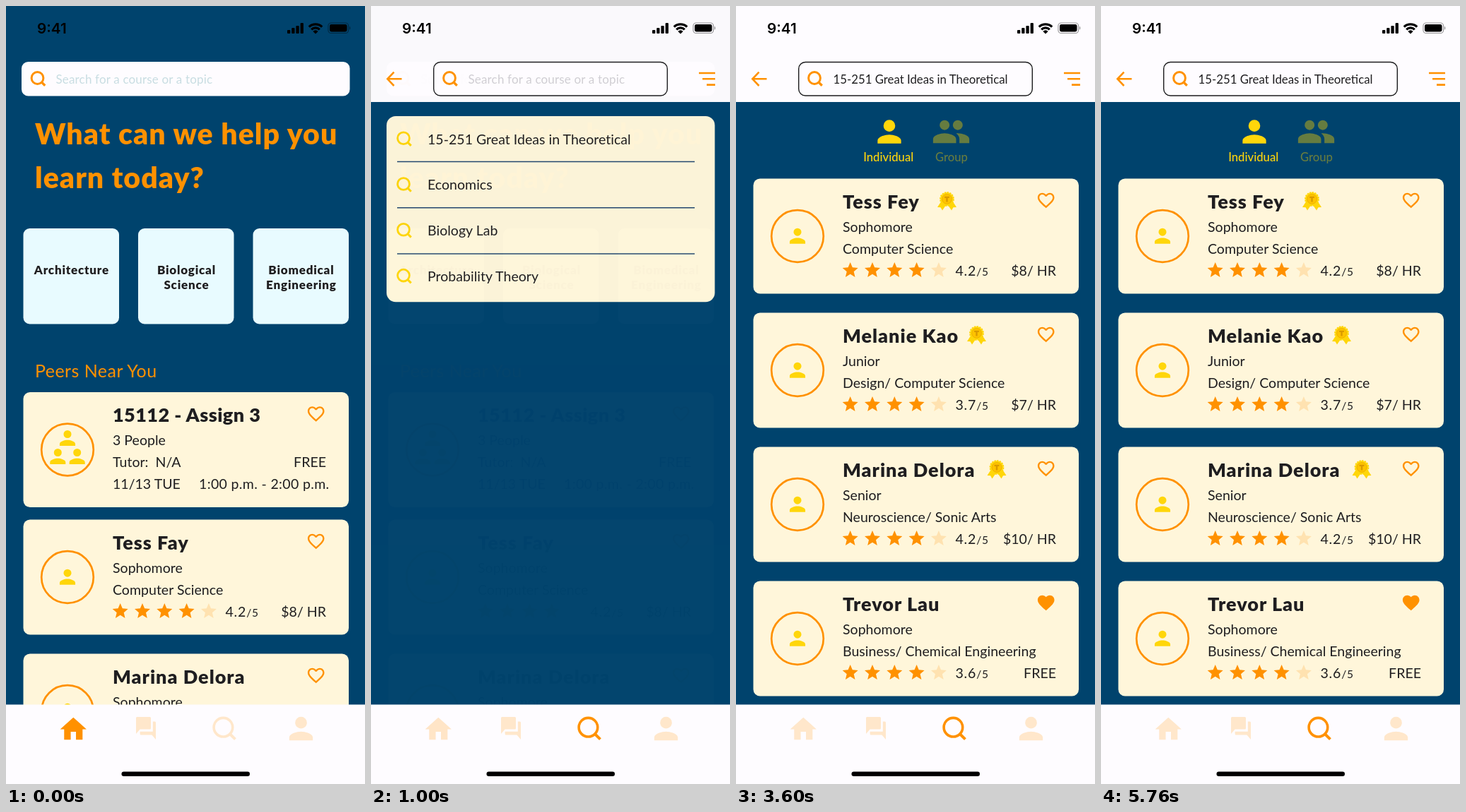
Animation of 508x1102 px, one loop 5800 ms. Source, as an HTML page:

```html
<!DOCTYPE html>
<html lang="en">
<head>
<meta charset="utf-8">
<title>Peer tutoring app</title>
<style>
html, body { margin: 0; width: 100%; height: 100%; overflow: hidden; background: #00436d; }
svg { display: block; width: 508px; height: 1102px; }
text { font-family: Lato, "Open Sans", sans-serif; white-space: pre; }
</style>
</head>
<body>
<svg id="stage" viewBox="0 0 508 1102"></svg>
<script>
const ORANGE = '#ff9100', PALE = '#ffe7cb', YELLOW = '#ffd60a', CREAM = '#fff6da',
      BLUE = '#00436d', INK = '#1f1e20', WHITE = '#fefcff';

// Icon outlines on a 24-unit grid
const HEART = 'M16.5 3c-1.74 0-3.41.81-4.5 2.09C10.91 3.81 9.24 3 7.5 3 4.42 3 2 5.42 2 8.5c0 3.78 3.4 6.86 8.55 11.54L12 21.35l1.45-1.32C18.6 15.36 22 12.28 22 8.5 22 5.42 19.58 3 16.5 3z';
const ICON = {
  person: 'M12 12a4 4 0 1 0 0-8 4 4 0 0 0 0 8zm0 2c-2.67 0-8 1.34-8 4v2h16v-2c0-2.66-5.33-4-8-4z',
  people: 'M16 11a3 3 0 1 0 0-6 3 3 0 0 0 0 6zm-8 0a3 3 0 1 0 0-6 3 3 0 0 0 0 6zm0 2c-2.33 0-7 1.17-7 3.5V19h14v-2.5c0-2.33-4.67-3.5-7-3.5zm8 0c-.29 0-.62.02-.97.05 1.16.84 1.97 1.97 1.97 3.45V19h6v-2.5c0-2.33-4.67-3.5-7-3.5z',
  home: 'M10 20v-6h4v6h5v-8h3L12 3 2 12h3v8z',
  chat: 'M21 6h-2v9H6v2c0 .55.45 1 1 1h11l4 4V7c0-.55-.45-1-1-1zm-4 6V3c0-.55-.45-1-1-1H3c-.55 0-1 .45-1 1v14l4-4h10c.55 0 1-.45 1-1z',
  star: 'M12 17.27L18.18 21l-1.64-7.03L22 9.24l-7.19-.61L12 2 9.19 8.63 2 9.24l5.46 4.73L5.82 21z',
  heart: HEART,
  heartLine: HEART + 'm-4.4 15.55l-.1.1-.1-.1C7.14 14.24 4 11.39 4 8.5 4 6.5 5.5 5 7.5 5c1.54 0 3.04.99 3.57 2.36h1.87C13.46 5.99 14.96 5 16.5 5c2 0 3.5 1.5 3.5 3.5 0 2.89-3.14 5.74-7.9 10.05z'
};

const icon = (name, x, y, scale, fill) =>
  `<path d="${ICON[name]}" fill="${fill}" fill-rule="evenodd" transform="translate(${x} ${y}) scale(${scale}) translate(-12 -12)"/>`;
const rect = (x, y, w, h, r, fill, extra = '') =>
  `<rect x="${x}" y="${y}" width="${w}" height="${h}" rx="${r}" fill="${fill}" ${extra}/>`;
const line = (d, color, width) =>
  `<path d="${d}" fill="none" stroke="${color}" stroke-width="${width}"/>`;
const text = (s, x, y, { size = 19.5, fill = INK, gap = 0.03, weight = 400, anchor = 'start' } = {}) =>
  `<text x="${x}" y="${y}" font-size="${size}" fill="${fill}" letter-spacing="${gap}" font-weight="${weight}" text-anchor="${anchor}">${s}</text>`;
const lens = (x, y, r, color, width) =>
  `<circle cx="${x}" cy="${y}" r="${r}" fill="none" stroke="${color}" stroke-width="${width}"/>` +
  line(`M${x + r * .68} ${y + r * .68}L${x + r * 1.28} ${y + r * 1.28}`, color, width * 1.1);

function statusBar() {
  const bars = [5, 8, 11, 15].map((h, i) => rect(398 + i * 6.2, 39 - h, 4.3, h, 1, '#000')).join('');
  const wifi = line('M428.8 29.6a13.2 13.2 0 0 1 18.4 0', '#000', 3.3) +
    line('M432.2 33.4a8 8 0 0 1 11.6 0', '#000', 3.1) +
    '<path d="M434.4 35.9a5 5 0 0 1 7.2 0L438 39.5z"/>';
  const battery = rect(456, 24, 28.5, 14.5, 4, 'none', 'stroke="#000" stroke-opacity=".4" stroke-width="1.2"') +
    rect(458, 26, 24.5, 10.5, 2.4, '#000') + '<path d="M486 28.5q2.6 2.7 0 5.4z" opacity=".45"/>';
  return `<text x="44" y="38.5" font-size="20.7" font-weight="600" style="font-family:Inter,sans-serif">9:41</text>` +
    bars + wifi + battery;
}

function navBar(active) {
  const tint = name => name === active ? ORANGE : PALE;
  return rect(0, 989.5, 508, 113, 0, WHITE) +
    icon('home', 95.3, 1024.4, 1.86, tint('home')) +
    icon('chat', 198, 1023, '1.4 1.6', PALE) +
    lens(307.4, 1021.7, 13.3, tint('search'), 3.6) +
    icon('person', 417.5, 1023.5, 2.08, PALE) +
    rect(163.5, 1084.5, 181.5, 6.5, 3.2, '#000');
}

function header(query, color, size, gap) {
  return rect(0, 0, 508, 136, 0, WHITE) + statusBar() +
    line('M43.5 103.3H24M32.5 93.6L23.3 103.3L32.5 113', ORANGE, 2.6) +
    rect(88.7, 79.5, 330.6, 47.5, 9.5, WHITE, 'stroke="#1c1c1e" stroke-width="1.4"') +
    lens(111, 102, 8.4, ORANGE, 3) +
    text(query, 137.5, 110, { size, fill: color, gap }) +
    line('M464 95H487M469 103.3H487M475 111.6H487', ORANGE, 2.6);
}

const card = (y, title, lines, gap = 1) =>
  rect(24.5, y, 460.5, 163, 9.5, CREAM) +
  `<circle cx="87" cy="${y + 81.5}" r="36.8" fill="none" stroke="${ORANGE}" stroke-width="2.7"/>` +
  text(title, 151, y + 42, { size: 27, weight: 900, gap }) +
  lines.map((s, i) => text(s, 151, y + 75 + i * 31.2)).join('');
const price = (s, y) => text(s, 453, y, { anchor: 'end' });

function personCard(y, name, year, major, score, cost, liked) {
  let s = card(y, name, [year, major]) + icon('person', 87, y + 81.2, 1.38, YELLOW) +
    icon(liked ? 'heart' : 'heartLine', 438.7, y + 30.8, 1.18, ORANGE);
  for (let i = 0; i < 5; i++)
    s += icon('star', 161.7 + i * 31.3, y + 129.5, 1.1, i < 4 ? ORANGE : '#ffe2b0');
  return s + text(`${score}<tspan font-size="15.5">/5</tspan>`, 310.5, y + 137, { gap: .8 }) + price(cost, y + 137);
}

function badge(x, y) {
  return `<g transform="translate(${x} ${y})">
    <path d="M-8 3L-13.5 11.5L-9 11.8L-6.5 16L-1 8zM8 3L13.5 11.5L9 11.8L6.5 16L1 8z" fill="${YELLOW}"/>
    <circle r="9.2" fill="${YELLOW}" stroke="${YELLOW}" stroke-width="2.4" stroke-dasharray="2.4 1.2"/>
    <circle r="6.8" fill="#ffc400" stroke="#eeb000" stroke-width="1"/>
    <path d="M-3.4 -3.8H3.4V-1.6H1.2V4H-1.2V-1.6H-3.4z" fill="#d99a00"/></g>`;
}

function homePage() {
  const tiles = [['Architecture'], ['Biological', 'Science'], ['Biomedical', 'Engineering']];
  const head = { size: 41, fill: ORANGE, gap: 1.05, weight: 900 };
  return rect(0, 0, 508, 1102, 0, BLUE) + statusBar() +
    rect(22, 79, 464.5, 48.5, 9.5, WHITE) + lens(44.5, 102, 8.4, ORANGE, 3) +
    text('Search for a course or a topic', 70.5, 110, { size: 17, fill: '#c8dde2', gap: .17 }) +
    text('What can we help you', 41, 195.5, head) + text('learn today?', 41, 258, head) +
    tiles.map((words, i) => rect(24.5 + i * 162.5, 315, 135.5, 135.5, 9, '#e8fbff') +
      words.map((w, j) => text(w, 92.9 + i * 162.5, 380 + j * 20.7,
        { size: 17, weight: 900, gap: .8, anchor: 'middle' })).join('')).join('') +
    text('Peers Near You', 41, 525.5, { size: 25, fill: ORANGE, gap: .45 }) +
    card(547, '15112 - Assign 3', ['3 People', 'Tutor:  N/A', '11/13 TUE'], .45) +
    icon('heartLine', 438.7, 577.8, 1.18, ORANGE) +
    [[87, 612], [73.3, 638], [100.7, 638]].map(([x, y]) => icon('person', x, y, 1.38, YELLOW)).join('') +
    price('FREE', 653) + text('1:00 p.m. - 2:00 p.m.', 273, 684, { gap: .35 }) +
    personCard(727.5, 'Tess Fay', 'Sophomore', 'Computer Science', '4.2', '$8/ HR') +
    personCard(917.5, 'Marina Delora', 'Sophomore', '', '4.2', '$10/ HR') +
    navBar('home');
}

function searchPage() {
  const rows = ['15-251 Great Ideas in Theoretical', 'Economics', 'Biology Lab', 'Probability Theory'];
  return rect(0, 0, 508, 1102, 0, BLUE) +
    header('Search for a course or a topic', '#d0ced3', 17, .17) +
    rect(22, 156, 464.5, 263.3, 13, CREAM) +
    rows.map((s, i) => lens(46, 187.2 + i * 64.8, 8.4, YELLOW, 2.8) +
      text(s, 80, 195.5 + i * 64.9) +
      (i < 3 ? line(`M37 ${220.5 + i * 65.2}H458`, '#24486f', 1.5) : '')).join('') +
    navBar('search');
}

function resultsPage() {
  const tutors = [
    ['Tess Fey', 'Sophomore', 'Computer Science', '4.2', '$8/ HR'],
    ['Melanie Kao', 'Junior', 'Design/ Computer Science', '3.7', '$7/ HR'],
    ['Marina Delora', 'Senior', 'Neuroscience/ Sonic Arts', '4.2', '$10/ HR'],
    ['Trevor Lau', 'Sophomore', 'Business/ Chemical Engineering', '3.6', 'FREE', true]
  ];
  const label = { size: 16.6, weight: 500, anchor: 'middle' };
  return rect(0, 0, 508, 1102, 0, BLUE) +
    header('15-251 Great Ideas in Theoretical', INK, 16.8, 0) +
    icon('person', 217, 178, 2.08, YELLOW) + icon('people', 304.5, 178, 2.33, '#667c40') +
    text('Individual', 215.7, 220, { ...label, fill: YELLOW }) +
    text('Group', 305, 220, { ...label, fill: '#667c40' }) +
    tutors.map((t, i) => personCard(244.5 + i * 190, ...t)).join('') +
    [298.5, 340.5, 369].map((x, i) => badge(x, 273.5 + i * 190)).join('') +
    navBar('search');
}

const stage = document.getElementById('stage');
stage.innerHTML = [homePage(), searchPage(), resultsPage()].map(p => `<g>${p}</g>`).join('');
const [, search, results] = stage.children;

// Ease-out, cubic-bezier(0, 0, .58, 1)
function easeOut(x) {
  if (x <= 0) return 0;
  if (x >= 1) return 1;
  let lo = 0, hi = 1;
  for (let i = 0; i < 20; i++) {
    const s = (lo + hi) / 2;
    if (1.74 * (1 - s) * s * s + s ** 3 < x) lo = s; else hi = s;
  }
  return 3 * (1 - lo) * lo * lo + lo ** 3;
}

const LOOP = 5800, FADE = 250, SEARCH_AT = 774, RESULTS_AT = 2900;
const start = performance.now();
function draw(now) {
  const t = Math.max(0, now - start) % LOOP;
  search.setAttribute('opacity', easeOut((t - SEARCH_AT) / FADE));
  results.setAttribute('opacity', easeOut((t - RESULTS_AT) / FADE));
  requestAnimationFrame(draw);
}
draw(start);
</script>
</body>
</html>
```
